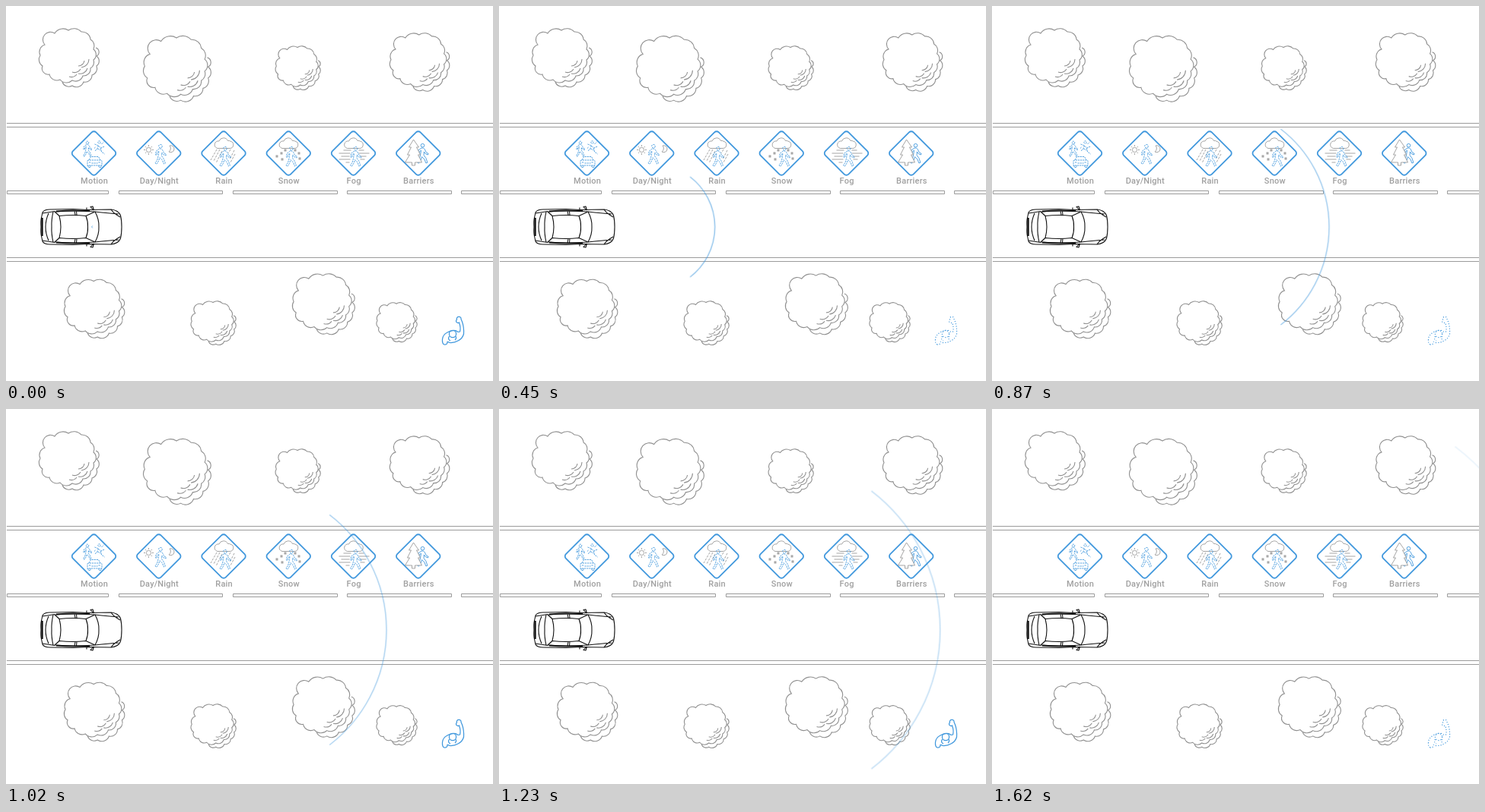
Animation, 640 px wide and 494 px high, one loop 1.8 s. Source, as an HTML page:

```html
<!DOCTYPE html>
<html lang="en">
<head>
<meta charset="utf-8">
<title>Road sensing</title>
<style>
  html, body { margin: 0; width: 100%; height: 100%; overflow: hidden; background: #fff; }
  svg { display: block; width: 640px; height: 494px; }
  path, rect, circle { fill: none; vector-effect: non-scaling-stroke; }
  .gray { stroke: #9b9b9b; stroke-width: 1; }
  .blue { stroke: #4198dd; stroke-width: 1; }
  .black { stroke: #111; stroke-width: 1.1; stroke-linejoin: round; }
  .thin { stroke-width: .9; }
  .dash { stroke-dasharray: 2.2 .9; }
  .frame { stroke-width: 1.8; }
  .cover { fill: #fff; }
  #trees { stroke: #909090; stroke-width: 1.1; }
  text { font: 500 11px Roboto, sans-serif; letter-spacing: .2px; fill: #a0a0a0; text-anchor: middle; }

  #wave { animation: sweep 1800ms infinite; }
  @keyframes sweep {
    0% { transform: scale(-.006); opacity: 1; stroke-width: .8px; animation-timing-function: steps(54); }
    90%, 100% { transform: scale(1); opacity: .1; stroke-width: 1.9px; }
  }
  #solid, #dots { animation: blink 900ms steps(1) infinite; }
  #solid { stroke-width: 1.25; }
  #dots { stroke-width: 1.15; stroke-dasharray: 1.2 2.1; animation-delay: -450ms; }
  @keyframes blink {
    0% { opacity: 1; }
    50%, 100% { opacity: 0; }
  }
</style>
</head>
<body>
<svg viewBox="0 0 640 494">
  <defs>
    <g id="tree">
      <path d="M9 23A10 10 0 0 1 22 8A13 13 0 0 1 40 4A13 13 0 0 1 57 6A11 11 0 0 1 69 16A10 10 0 0 1 73 29A9 9 0 0 1 73 43A9 9 0 0 1 69 54A9 9 0 0 1 59 64A10 10 0 0 1 45 70A11 11 0 0 1 29 69A10 10 0 0 1 15 62A8 8 0 0 1 6 51A10 10 0 0 1 3 37A10 10 0 0 1 9 23Z"/>
      <path d="M76 27A6 6 0 0 1 77 38A8 8 0 0 1 77 51A9 9 0 0 1 71 63A9 9 0 0 1 60 72A10 10 0 0 1 45 77A9 9 0 0 1 32 72"/>
      <path d="M67 42A11 11 0 0 1 57 53M61 44A8 8 0 0 1 53 51M65 54A10 10 0 0 1 53 61M56 55A9 9 0 0 1 45 59M51 62A9 9 0 0 1 41 65"/>
    </g>
    <g id="walker">
      <circle cy="-10.3" r="2.3"/>
      <path d="M-1.5-7L-5.6-4L-6.6 1L-5 1.4L-4-2.4L-2-3.8L-3 3L-4.4 8L-7 12L-5 13.2L-2.4 9L-1 4.6L2.4 8L4.4 13L6.4 12.2L4.4 6.4L1.6 2.6L1.8-2L4 .8L7 2L7.6 .4L5-.8L2.6-5.4L1-7Z"/>
    </g>
    <path id="cloud" d="M-8 6.500H8A4.700 4.700 0 0 0 9-2.800A4 4 0 0 0 5.500-3.500A6.200 6.200 0 0 0-6-3A4.800 4.800 0 0 0-8 6.500Z"/>
    <path id="flake" d="M-2 0H2M-1-1.8L1 1.8M1-1.8L-1 1.8"/>
    <g id="side">
      <path d="M46 291Q45.5 283 46.500 279L48 272Q50 268 58 268L88 267.500L108 268.500L138 268Q148 269 150.500 276Q152 282 152 291"/>
      <path d="M64 271Q88 269 117 271L105 276.500Q88 274.500 70 276.500ZM90 270L91 275.500M92.500 270L93 275.500"/>
      <path d="M66 270.500Q88 268.500 110 270" stroke-width="1.8"/>
      <path d="M70 276.500Q72 284 72 291M62 271Q59.500 282 60 291M56 273Q52 282 52 291M48 273L64 270.500"/>
      <path d="M105 276.500Q108 284 107.500 291M117 271Q122.500 281 122 291M117 271Q135 273 148 274M138 268Q141 273 150 278"/>
      <path d="M115 269L111 264.500L114 264L115.500 269M106 268V265.500"/>
      <path d="M47.500 279V291" stroke-width="2.4"/>
    </g>
    <g id="person">
      <circle cx="587" cy="432" r="4.6"/>
      <path d="M576 446Q573 445 573.500 439Q574 433 580 430Q585 426.500 591 427.500Q593.500 430 596.500 429Q598 424 595.500 417A2.500 2.500 0 0 1 592.500 413A2.500 2.500 0 0 1 595 409.500A2.500 2.500 0 0 1 598 412.500L599.500 416Q602 423 601.500 432Q600 438 594 441Q589 444 583 443.500Q579 441 580 444Q579 446.500 576 446Z"/>
      <path d="M582.500 435Q580 439 584 441M591 435Q592.500 438 590 440"/>
    </g>
  </defs>

  <g id="trees"></g>
  <path class="gray" d="M1 154.500H640M1 159.500H640M1 331.500H640M1 336.500H640"/>
  <g class="gray">
    <rect x="1.500" y="243.500" width="133" height="4"/>
    <rect x="148.500" y="243.500" width="136" height="4"/>
    <rect x="298.500" y="243.500" width="137" height="4"/>
    <rect x="448.500" y="243.500" width="137" height="4"/>
    <rect x="598.500" y="243.500" width="50" height="4"/>
  </g>
  <g id="signs"></g>

  <g transform="translate(115.500 194)" class="blue thin dash">
    <use href="#walker" transform="translate(-8.500 -6) scale(.78)"/>
    <path d="M1-12L6-10L9-7L14-9M6-10L4-5L1-3M9-7L10-2L14 1M5-6L9-4M10-12L13-15M2-8L0-6"/>
    <circle cx="7" cy="-14.500" r="1.700"/>
    <path d="M-6.500 9L-4 4.500H6L8.500 9M-8.500 10Q-8 9-6.500 9H8.500Q10 9 10.500 10V16H-8.500ZM-7.500 16V18.500H-4.500V16M6.500 16V18.500H9.500V16M-3 13H5M-6.500 12H-4M6 12H8.500"/>
  </g>

  <g transform="translate(201 194)" class="thin">
    <g class="gray thin">
      <circle cx="-13.500" cy="-4.500" r="3.100"/>
      <path d="M-13.500-9V-11M-13.500 0V2M-18-4.500H-20M-9-4.500H-7M-16.700-7.700L-18-9M-10.300-7.700L-9-9M-16.700-1.300L-18 0M-10.300-1.300L-9 0"/>
      <path d="M14-10A4.500 4.500 0 1 1 13-2A5.300 5.300 0 0 0 14-10Z"/>
    </g>
    <use href="#walker" class="blue thin dash" x="2" y="1"/>
  </g>

  <g transform="translate(286 194)">
    <g class="gray thin">
      <use href="#cloud" y="-13"/>
      <path stroke-dasharray="3 1.500" d="M-9-5L-17 9M-5-5L-13 10M-2-3L-10 13M9-5L6 0M14-4L8 8M15 1L9 12"/>
    </g>
    <use href="#walker" class="blue thin dash" x="2" y="4"/>
  </g>

  <g transform="translate(371 194)">
    <g class="gray thin">
      <use href="#cloud" y="-13"/>
      <use href="#flake" x="-15" y="4"/><use href="#flake" x="-9" y="0"/>
      <use href="#flake" x="-8" y="8"/><use href="#flake" x="-4" y="-4"/>
      <use href="#flake" x="14" y="0"/><use href="#flake" x="15" y="7"/>
      <use href="#flake" x="9" y="-4"/>
    </g>
    <use href="#walker" class="blue thin dash" x="4" y="4"/>
  </g>

  <g transform="translate(456.500 194)">
    <g class="gray thin">
      <use href="#cloud" y="-13"/>
      <path d="M-13-4H-3M7-4H14M-19 0H-4M7 0H21M-16 4H-5M9 4H17M-19 8H-4M9 8H15M-10 12H-5"/>
    </g>
    <use href="#walker" class="blue thin dash" x="3" y="4"/>
  </g>

  <g transform="translate(541.500 194)">
    <use href="#walker" class="blue thin" x="6" y="0"/>
    <path class="gray thin cover" d="M-6-18L-12-8H-9L-14 2H-11L-17 12H-8V16H-4V12H5L0 2H3L-2-8H1Z"/>
  </g>

  <g class="black">
    <use href="#side"/>
    <use href="#side" transform="matrix(1 0 0 -1 0 582)"/>
  </g>
  <use id="solid" class="blue" href="#person"/>
  <use id="dots" class="blue" href="#person"/>
  <g transform="translate(116.600 291)">
    <path id="wave" class="blue" d="M491.900-241.500A304.300 304.300 0 0 1 491.900 241.500"/>
  </g>
</svg>
<script>
  // x, y, size
  const trees = [
    [42, 28, 80], [179, 37.5, 90], [353, 51.5, 60], [503, 34, 79.5],
    [75, 358.5, 80.5], [242, 387.5, 60], [375, 351, 83], [486, 389.5, 54]
  ];
  document.getElementById('trees').innerHTML = trees.map(([x, y, size]) =>
    `<use href="#tree" transform="translate(${x} ${y}) scale(${size / 80})"/>`).join('');

  const labels = ['Motion', 'Day/Night', 'Rain', 'Snow', 'Fog', 'Barriers'];
  document.getElementById('signs').innerHTML = labels.map((label, i) => {
    const x = 115.5 + i * 85.25;
    return `<rect class="blue frame" x="-21.5" y="-21.5" width="43" height="43" rx="4"
      transform="translate(${x} 194) rotate(45)"/><text x="${x + .6}" y="234">${label}</text>`;
  }).join('');
</script>
</body>
</html>
```
